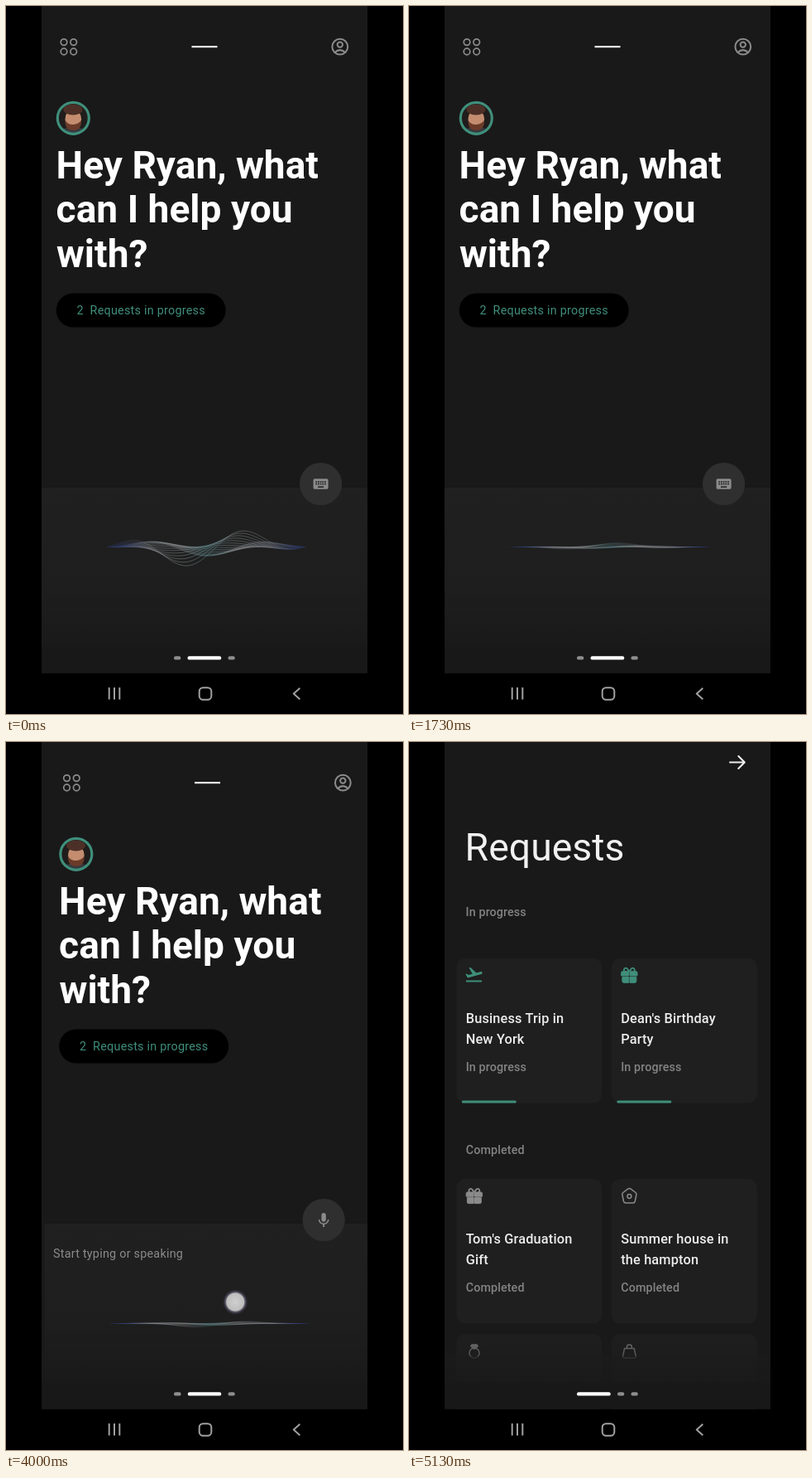
Recreate the animation shown at these times as an HTML page. Size 480x854 px, loop 5.2 s.

```html
<!DOCTYPE html>
<html lang="en">
<head>
<meta charset="utf-8">
<title>Assistant home</title>
<style>
html, body { margin: 0; width: 100%; height: 100%; overflow: hidden; background: #000; }
svg { display: block; width: 100%; height: 100%; font-family: Roboto, sans-serif; }
.line { fill: none; stroke: #8b8b8b; stroke-width: 1.7; stroke-linecap: round; stroke-linejoin: round; }
.hero { font-size: 46.1px; font-weight: 700; fill: #fff; }
.body { font-size: 14.35px; letter-spacing: .25px; fill: #8b8b8b; }
.label { font-size: 14.3px; font-weight: 500; letter-spacing: .12px; fill: #838383; }
.name { font-size: 16.35px; font-weight: 500; letter-spacing: .15px; fill: #ededed; }
.gray { fill: #8b8b8b; }
.teal { fill: #3f8f7b; }
</style>
</head>
<body>
<svg viewBox="0 0 480 854">
  <defs>
    <clipPath id="screen"><rect x="43" width="394" height="804.5"/></clipPath>
    <clipPath id="face"><circle cx="81.3" cy="135.3" r="18"/></clipPath>
    <linearGradient id="panel" x2="0" y2="1">
      <stop stop-color="#202020"/><stop offset="1" stop-color="#1c1c1c"/>
    </linearGradient>
    <linearGradient id="fade" x2="0" y2="1">
      <stop stop-color="#191919" stop-opacity="0"/>
      <stop offset=".38" stop-color="#1a1a1a" stop-opacity=".5"/>
      <stop offset=".4" stop-color="#1b1b1b" stop-opacity=".8"/>
      <stop offset=".68" stop-color="#191919" stop-opacity=".85"/>
      <stop offset=".7" stop-color="#181818"/>
    </linearGradient>
    <linearGradient id="glow" gradientUnits="userSpaceOnUse" x1="120" x2="364">
      <stop stop-color="#2c3c80" stop-opacity="0"/>
      <stop offset=".08" stop-color="#33457f" stop-opacity=".7"/>
      <stop offset=".22" stop-color="#8f949a"/>
      <stop offset=".38" stop-color="#a8acae"/>
      <stop offset=".5" stop-color="#70a6ad"/>
      <stop offset=".65" stop-color="#a3a7a9"/>
      <stop offset=".82" stop-color="#7d828e"/>
      <stop offset=".94" stop-color="#33437a" stop-opacity=".7"/>
      <stop offset="1" stop-color="#2c3c80" stop-opacity="0"/>
    </linearGradient>
    <radialGradient id="finger">
      <stop stop-color="#cfcfcf"/><stop offset=".66" stop-color="#bdbdbd"/>
      <stop offset=".72" stop-color="#6a6672"/><stop offset=".85" stop-color="#2f2b38"/>
      <stop offset="1" stop-color="#222" stop-opacity="0"/>
    </radialGradient>
    <g id="gift">
      <path d="M0 6.5Q0 5 1.5 5H9V10.2H0ZM10.3 5H17.8Q19.3 5 19.3 6.5V10.2H10.3ZM1.2 11.6H9V18.6H2.8Q1.2 18.6 1.2 17ZM10.3 11.6H18.1V17Q18.1 18.6 16.5 18.6H10.3Z"/>
      <path d="M9.3 5.4C8 2.2 6.9.9 5.3.9C2.9.9 2.7 4.2 4 5.4M10 5.4C11.3 2.2 12.4.9 14 .9C16.4.9 16.6 4.2 15.3 5.4" fill="none" stroke-width="1.9"/>
    </g>
  </defs>

  <g clip-path="url(#screen)">
    <rect x="43" width="394" height="805" fill="#191919"/>

    <g id="home">
      <g class="line">
        <circle cx="70" cy="43.6" r="3.8"/><circle cx="81.7" cy="43.6" r="3.8"/>
        <circle cx="70" cy="55" r="3.8"/><circle cx="81.7" cy="55" r="3.8"/>
        <g stroke-width="2">
          <circle cx="403.8" cy="49.2" r="9.4"/><circle cx="403.8" cy="46.6" r="3.2"/>
          <path d="M397.5 56Q403.8 50.2 410.1 56"/>
        </g>
      </g>
      <rect x="224.5" y="48" width="31" height="2.2" fill="#f4f4f4"/>

      <g clip-path="url(#face)">
        <rect x="60" y="114" width="43" height="43" fill="#201d1c"/>
        <path d="M62 158Q64 146 81 146T100 158Z" fill="#353a3f"/>
        <ellipse cx="81.3" cy="136.5" rx="9.8" ry="11.5" fill="#c48d6f"/>
        <path d="M71.6 138Q75 143.5 81.3 143T91 138Q91.5 150 81.3 150T71.6 138Z" fill="#6b3b2a"/>
        <ellipse cx="81" cy="125" rx="11.5" ry="6.5" fill="#4c3027"/>
      </g>
      <circle cx="81.3" cy="135.3" r="19" fill="none" stroke="#3f8f7b" stroke-width="3.2"/>

      <g class="hero">
        <text x="60.6" y="208">Hey Ryan, what</text>
        <text x="60.6" y="261.3">can I help you</text>
        <text x="61" y="314.5">with?</text>
      </g>
      <rect x="60.7" y="346.5" width="205" height="41" rx="20.5"/>
      <text class="body" x="85.4" y="372" style="fill:#3f8f7b">2</text>
      <text class="body" x="101.6" y="372" style="fill:#3f8f7b">Requests in progress</text>

      <rect x="43" y="581" width="394" height="224" fill="url(#panel)"/>
      <circle cx="380.6" cy="576.5" r="25.6" fill="#2f2f2f"/>
      <path id="keys" class="gray" fill-rule="evenodd" transform="translate(369.8 565.7) scale(.9)" d="M20 5H4c-1.1 0-2 .9-2 2v10c0 1.1.9 2 2 2h16c1.1 0 2-.9 2-2V7c0-1.1-.9-2-2-2zm-9 3h2v2h-2zm0 3h2v2h-2zM8 8h2v2H8zm0 3h2v2H8zM5 8h2v2H5zm0 3h2v2H5zm3 4h8v2H8zm6-7h2v2h-2zm0 3h2v2h-2zm3-3h2v2h-2zm0 3h2v2h-2z"/>
      <g id="voice">
        <path class="gray" transform="translate(369.8 566.1) scale(.9)" d="M12 14c1.66 0 3-1.34 3-3V5c0-1.66-1.34-3-3-3S9 3.34 9 5v6c0 1.66 1.34 3 3 3zm5.3-3c0 3-2.54 5.1-5.3 5.1S6.7 14 6.7 11H5c0 3.41 2.72 6.23 6 6.72V21h2v-3.28c3.28-.48 6-3.3 6-6.72z"/>
        <text class="body" x="53.4" y="622">Start typing or speaking</text>
      </g>
      <g id="wave" fill="none" stroke="url(#glow)"></g>
    </g>

    <g id="requests">
      <path class="line" d="M388 24.5H405.5M398.3 17L405.8 24.5L398.3 32" style="stroke:#eee;stroke-width:2"/>
      <text x="67.6" y="143" font-size="46.4" fill="#f1f1f1">Requests</text>
      <text class="label" x="68.6" y="210">In progress</text>
      <text class="label" x="68.8" y="497">Completed</text>
      <g id="cards"></g>
      <path class="teal" transform="translate(66.5 268.5)" d="M2.5 19h19v2h-19v-2zm19.57-9.36c-.21-.8-1.04-1.28-1.84-1.06L14.92 10l-6.9-6.43-1.93.51 4.14 7.17-4.97 1.33-1.97-1.54-1.45.39 2.59 4.49L21 11.49c.81-.23 1.28-1.05 1.07-1.85z"/>
      <use href="#gift" x="256.7" y="271.7" class="teal" stroke="#3f8f7b"/>
      <use href="#gift" x="69.2" y="538" class="gray" stroke="#8b8b8b"/>
      <g class="line" style="stroke-width:1.5">
        <path d="M264.6 539.2Q266.4 538 268.2 539.2L274 543.5Q275.3 544.6 274.9 546.2L273.3 554Q272.8 556 270.8 556H262Q260 556 259.5 554L257.9 546.2Q257.5 544.6 258.8 543.5Z"/>
        <circle cx="266.4" cy="548" r="2.4"/>
        <circle cx="79" cy="737" r="6"/>
        <path d="M76 727H82L83.2 728.8L79 732.2L74.8 728.8Z" fill="#8b8b8b"/>
        <path d="M260.6 731.5H272.2L274.3 741Q274.5 743 272.5 743H260.3Q258.3 743 258.5 741ZM263.5 731V729.5Q263.5 727 266.4 727T269.3 729.5V731"/>
      </g>
    </g>

    <rect x="43" y="700" width="394" height="105" fill="url(#fade)"/>
    <g id="pager"></g>
    <circle id="touch" r="16" fill="url(#finger)"/>
  </g>

  <g class="line" style="stroke:#a0a0a0;stroke-width:2;stroke-linecap:butt">
    <path d="M124.7 822V836.5M131 822V836.5M137.3 822V836.5M355.3 822.8L347.8 829.5L355.3 836.2"/>
    <rect x="233.7" y="822.2" width="14.6" height="14.6" rx="4.5"/>
  </g>
</svg>
<script>
const LOOP = 5200, PAGE = 394, SWITCH = 2530, STRANDS = 14, WAVELENGTH = 155;
const $ = id => document.getElementById(id);

// Linear interpolation through [time, value] pairs.
function at(keys, t) {
  const i = keys.findIndex(k => k[0] > t);
  if (i < 0) return keys[keys.length - 1][1];
  if (i === 0) return keys[0][1];
  const [t0, a] = keys[i - 1], [t1, b] = keys[i];
  return a + (b - a) * (t - t0) / (t1 - t0);
}

const slide = [[3930, 0], [4000, 3], [4070, 40], [4130, 190], [4200, 340], [4270, 389], [4400, 392.5], [4700, 394]];
const height = [[0, 24], [400, 22], [600, 16], [800, 10], [1000, 13], [1300, 22], [1600, 8], [1730, 5], [2130, 7], [2500, 5], [5200, 4]];
const crest = [[0, 278], [800, 128], [1730, -70], [3270, -425], [4000, -490], [5200, -730]];
const skew = [[0, 1], [800, 1.35], [1730, 1]];
const tap = [[2270, 0], [2340, 1], [2730, 1], [2870, 0]];
const swipe = [[3870, 0], [3940, 1], [4130, 1], [4270, .12], [4330, 0]];
const swipeX = [[3930, 275], [4000, 277], [4070, 295], [4130, 313]];

function card(x, y, lines, status) {
  const bar = status === 'In progress'
    ? `<rect x="${x + 6.5}" y="432.6" width="66" height="3" rx="1.5" class="teal"/>` : '';
  const left = x + 11.4;
  const text = lines ? `<text class="name" x="${left}" y="${y + 78.3}">${lines[0]}</text>
    <text class="name" x="${left}" y="${y + 102.7}">${lines[1]}</text>
    <text class="label" x="${left}" y="${y + 136}">${status}</text>` : '';
  return `<rect x="${x}" y="${y}" width="176" height="174.5" rx="11" fill="#1f1f1f"/>${text}${bar}`;
}

$('cards').innerHTML =
  card(57.3, 261, ['Business Trip in', 'New York'], 'In progress') +
  card(244.8, 261, ['Dean\'s Birthday', 'Party'], 'In progress') +
  card(57.3, 527, ['Tom\'s Graduation', 'Gift'], 'Completed') +
  card(244.8, 527, ['Summer house in', 'the hampton'], 'Completed') +
  card(57.3, 714, null, '') + card(244.8, 714, null, '');
$('wave').innerHTML = '<path stroke-width=".65"/>'.repeat(STRANDS);
$('pager').innerHTML = '<rect y="784.2" height="4.4" rx="2.2"/>'.repeat(3);

function drawWave(t) {
  const base = t < SWITCH ? 652.5 : 701.5;
  const amp = at(height, t), peak = at(crest, t), lean = at(skew, t);
  $('wave').setAttribute('stroke-opacity', .16 + .018 * amp);
  [...$('wave').children].forEach((path, i) => {
    // Strands crowd around the base line and drift apart in phase.
    const f = i / (STRANDS - 1), gain = 1.45 * (1 - f) ** 1.6 - .45, top = peak + 50 * (.3 - f);
    let d = '';
    for (let x = 122; x <= 362; x += 4) {
      const u = (x - 122) / 240;
      const env = Math.max(0, Math.sin(Math.PI * u ** lean)) ** (2.6 - amp / 15);
      const y = base - amp * gain * env * Math.cos(2 * Math.PI * (x - top) / WAVELENGTH);
      d += (d ? 'L' : 'M') + x + ' ' + y.toFixed(2);
    }
    path.setAttribute('d', d);
  });
}

function drawPager(page) {
  let x = 203;
  [...$('pager').children].forEach((dot, i) => {
    const on = Math.max(0, 1 - Math.abs(page - i)), w = 8.3 + 32.5 * on, c = 142 + 113 * on;
    dot.setAttribute('x', x);
    dot.setAttribute('width', w);
    dot.setAttribute('fill', `rgb(${c},${c},${c})`);
    x += w + 8.2;
  });
}

function draw(now) {
  const t = now % LOOP, dx = at(slide, t), typed = t >= SWITCH;
  $('home').setAttribute('transform', `translate(${dx} 0)`);
  $('requests').setAttribute('transform', `translate(${dx - PAGE} 0)`);
  $('keys').style.display = typed ? 'none' : '';
  $('voice').style.display = typed ? '' : 'none';
  drawWave(t);
  drawPager(1 - dx / PAGE);
  const swiping = t > 3500, touch = $('touch');
  touch.setAttribute('cx', swiping ? at(swipeX, t) : 379);
  touch.setAttribute('cy', swiping ? 675.5 : 568);
  touch.setAttribute('opacity', at(swiping ? swipe : tap, t));
  requestAnimationFrame(draw);
}
requestAnimationFrame(draw);
</script>
</body>
</html>
```
